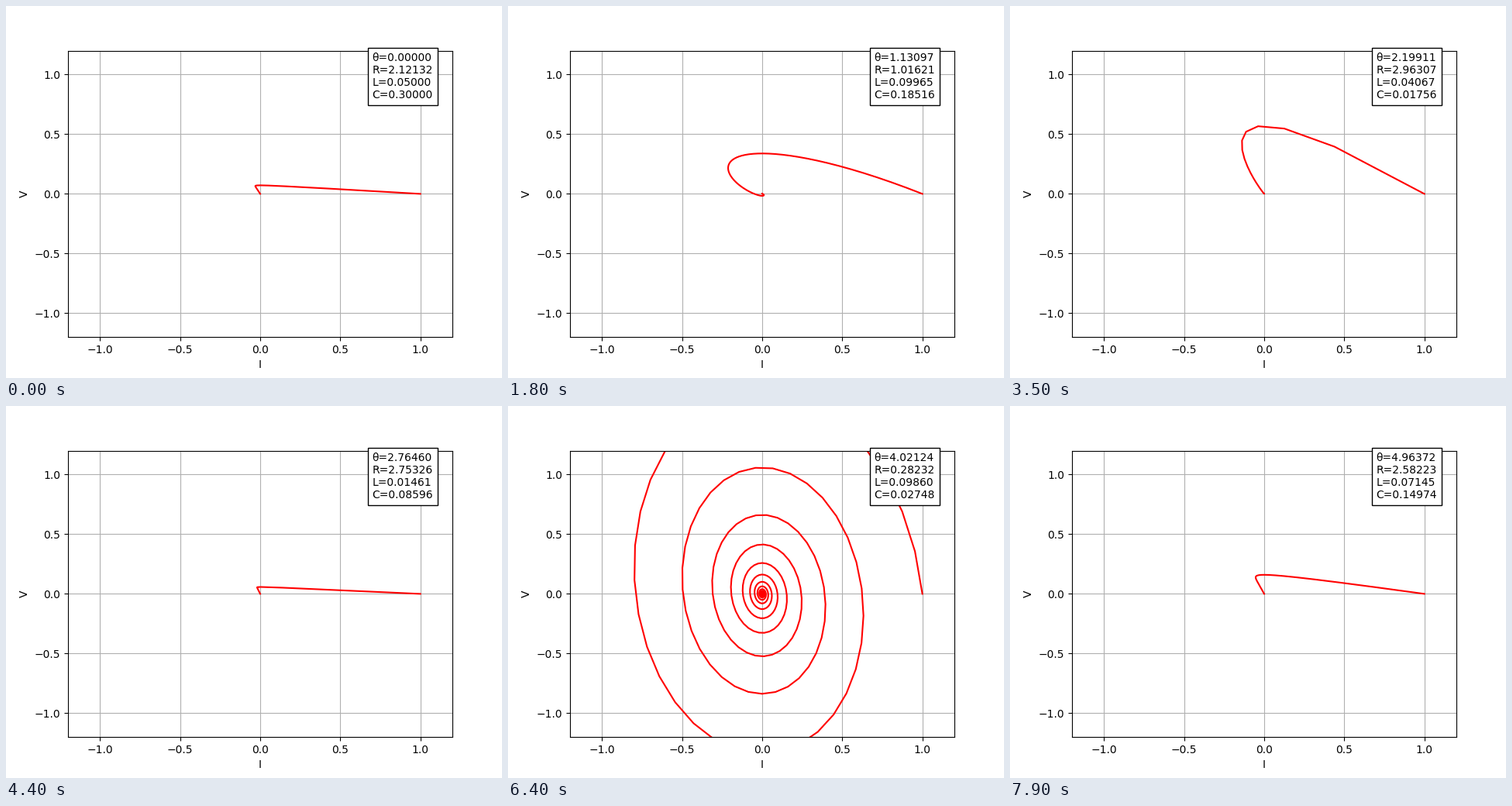
Animation of 640 by 480 pixels, one loop 8000 ms. Source, as a matplotlib script:

```python
import numpy as np
import matplotlib.pyplot as plt
from matplotlib.animation import FuncAnimation

FRAMES = 80
STEP = 2 * np.pi / 100
t = np.arange(0, 10, 0.01)


def params(theta):
    """Resistance, inductance and capacitance for a given angle."""
    r = 3 * abs(np.sin(theta - np.pi / 4))
    l = 0.1 * abs(np.sin(theta + np.pi / 6))
    c = abs(0.1 + 0.2 * np.cos(theta))
    return r, l, c


def discharge(r, l, c):
    """Current and voltage of a free series RLC circuit with I=1, V=0 at t=0."""
    a = r / (2 * l)
    s = np.sqrt(a * a - 1 / (l * c) + 0j)
    p, q = -a + s, -a - s
    ep, eq = np.exp(p * t), np.exp(q * t)
    current = (p * ep - q * eq) / (2 * s)
    voltage = (ep - eq) / (2 * s * c)
    return current.real, voltage.real


fig, ax = plt.subplots(figsize=(6.4, 4.8), dpi=100)
ax.set_xlim(-1.2, 1.2)
ax.set_ylim(-1.2, 1.2)
ax.set_xlabel("I")
ax.set_ylabel("V")
ax.grid()
curve, = ax.plot([], [], color="red")
info = ax.text(0.7, 0.8, "", bbox=dict(facecolor="white"))


def update(i):
    theta = i * STEP
    r, l, c = params(theta)
    curve.set_data(*discharge(r, l, c))
    info.set_text(f"θ={theta:.5f}\nR={r:.5f}\nL={l:.5f}\nC={c:.5f}")
    return curve, info


anim = FuncAnimation(fig, update, frames=FRAMES, interval=100, repeat=True)
plt.show()
```
